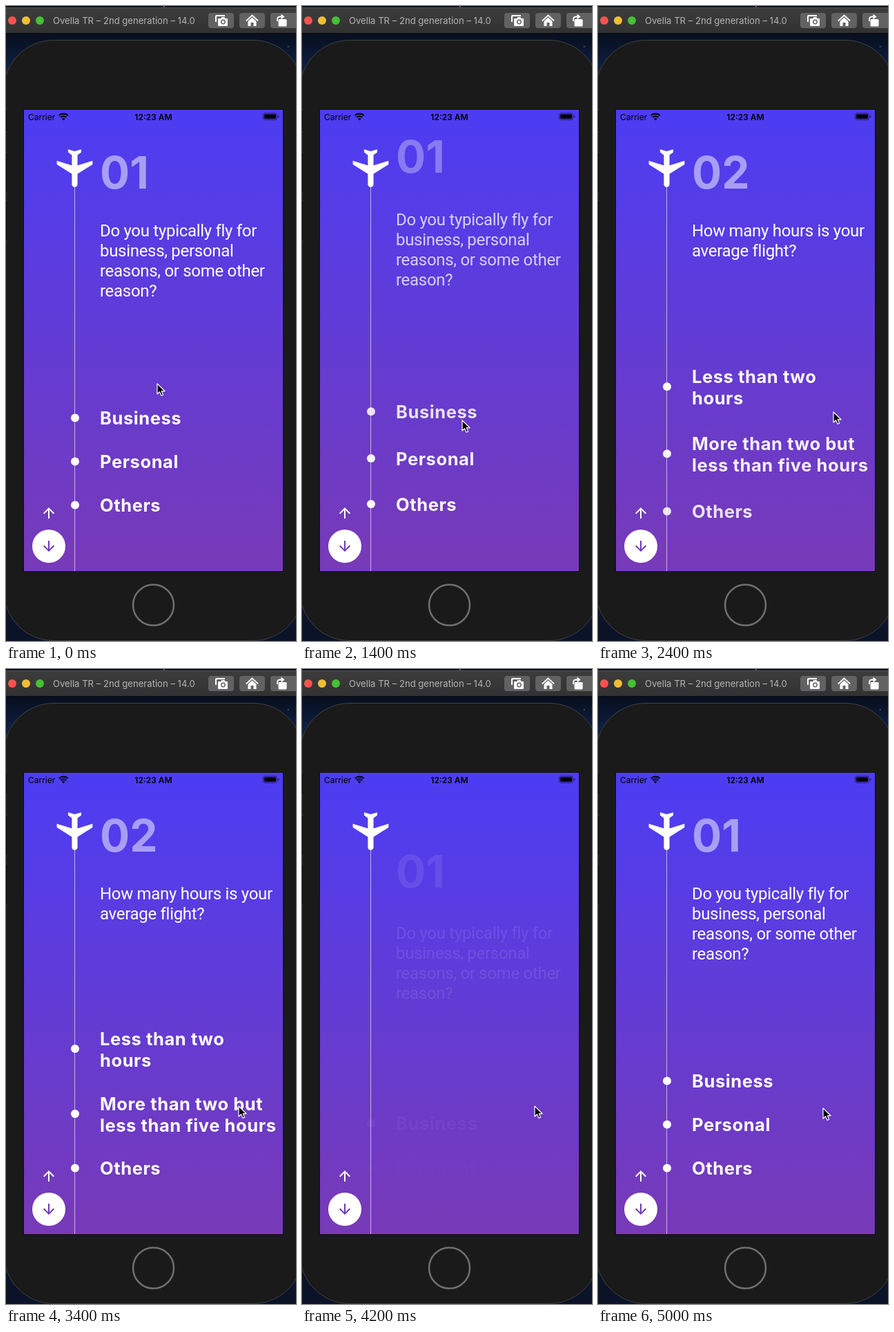
An HTML page that plays this animation: 420 px wide and 918 px high, repeating every 5100 ms.

```html
<!DOCTYPE html>
<html lang="en">
<head>
<meta charset="utf-8">
<title>Flight survey</title>
<style>
html, body { margin: 0; width: 100%; height: 100%; overflow: hidden; background: #0e1b38; }
svg { display: block; width: 420px; height: 918px; }
text { font-family: Inter, sans-serif; white-space: pre; }
.num { font-size: 64px; font-weight: 700; fill-opacity: .5; }
.ask { font-family: Roboto, sans-serif; font-size: 24px; letter-spacing: -.3px; }
.opt { font-size: 25.5px; font-weight: 700; letter-spacing: .57px; }
</style>
</head>
<body>
<svg viewBox="0 0 420 918">
  <defs>
    <linearGradient id="sky" x2="0" y2="1">
      <stop stop-color="#4c3df3"/><stop offset="1" stop-color="#783ab7"/>
    </linearGradient>
    <linearGradient id="bar" x2="0" y2="1">
      <stop stop-color="#3d3d3e"/><stop offset="1" stop-color="#313132"/>
    </linearGradient>
    <linearGradient id="desk" x2="0" y2="1">
      <stop offset=".04" stop-color="#070d1c"/>
      <stop offset=".11" stop-color="#10244a"/>
      <stop offset="1" stop-color="#0b1328"/>
    </linearGradient>
  </defs>

  <!-- desktop and window bar -->
  <rect width="420" height="918" fill="url(#desk)"/>
  <path d="M228 0h2v1.5h-2zM408 58h1.5v1.5h-1.5z" fill="#9fb0cc" opacity=".6"/>
  <rect y="2" width="420" height="37" fill="url(#bar)"/>
  <path d="M0 2.5H420" stroke="#58585a"/>
  <path d="M0 39.5H420" stroke="#080a10"/>
  <circle cx="9" cy="21" r="6" fill="#f9544f"/>
  <circle cx="29" cy="21" r="6" fill="#f0be32"/>
  <circle cx="49" cy="21" r="6" fill="#45c034"/>
  <text x="68" y="26" font-size="13.1" fill="#b4b4b5">Ovella TR – 2nd generation – 14.0</text>
  <g fill="#626263">
    <rect x="293" y="10" width="37" height="22" rx="4"/>
    <rect x="338" y="10" width="37" height="22" rx="4"/>
    <rect x="383" y="10" width="41" height="22" rx="4"/>
  </g>
  <g fill="#fff">
    <path d="M303 23V15q0-2 2-2h12v2h-11q-1 0-1 1v7z"/>
    <path d="M308 18h3l1.5-2h4l1.5 2h2q1 0 1 1v9q0 1-1 1h-12q-1 0-1-1V19q0-1 1-1z"/>
    <circle cx="314.5" cy="23" r="2.7" fill="none" stroke="#626263" stroke-width="1.4"/>
    <path d="M347.8 21.5l8.7-8 8.7 8" fill="none" stroke="#fff" stroke-width="1.8"/>
    <path d="M350.5 22l6-5.5 6 5.5v7h-4v-5h-4v5h-4z"/>
    <rect x="394.5" y="19" width="12" height="10.500" rx="1.5"/>
    <path d="M393 22v-2.500q0-4 4-4h2.500" fill="none" stroke="#fff" stroke-width="1.8"/>
    <path d="M398.500 11.500l5 4-5 4z"/>
  </g>

  <!-- phone -->
  <rect x="-3" y="49.5" width="433" height="868" rx="72" fill="#1a1a1a" stroke="#414143"/>
  <path d="M.5 150v32M.5 212v58M.5 282v58" stroke="#070707"/>
  <path d="M0 150h1M0 182h1M0 212h1M0 270h1M0 282h1M0 340h1" stroke="#555"/>
  <circle cx="213.5" cy="866" r="29.5" fill="none" stroke="#707070" stroke-width="2.5"/>
  <rect x="25.5" y="149.5" width="376" height="668" fill="none" stroke="#0c0c10"/>
  <rect x="26" y="150" width="375" height="667" fill="url(#sky)"/>

  <!-- status bar -->
  <text x="32" y="164.5" font-size="12">Carrier</text>
  <g fill="none" stroke="#000" stroke-width="2.2">
    <path d="M76.8 158.3a9 9 0 0 1 12.8 0"/>
    <path d="M79.2 161a5.6 5.6 0 0 1 8 0"/>
  </g>
  <path d="M83.2 165.5l-2.3-2.4a3.3 3.3 0 0 1 4.6 0z"/>
  <text x="213.5" y="164.5" font-size="12" font-weight="600" text-anchor="middle">12:23 AM</text>
  <rect x="372.5" y="155" width="20" height="9.5" rx="2.7" fill="none" stroke="#000" stroke-opacity=".6"/>
  <rect x="374" y="156.5" width="17" height="6.5" rx="1.4"/>
  <path d="M394 158v3.5q1.5-.5 1.5-1.75t-1.5-1.75z" opacity=".6"/>

  <!-- timeline -->
  <path d="M99.5 258V817" stroke="#fff" stroke-opacity=".6"/>
  <g id="pages" fill="#fff"></g>
  <path fill="#fff" transform="translate(68.2 267.2) scale(2.72 -2.72)"
    d="M21 16v-2l-8-5V3.5c0-.83-.67-1.5-1.5-1.5S10 2.67 10 3.5V9l-8 5v2l8-2.5V19l-2 1.5V22l3.5-1 3.5 1v-1.5L13 19v-5.5l8 2.5z"/>
  <circle cx="62" cy="781" r="24" fill="#fff"/>
  <defs>
    <path id="arrow" d="M4 12l1.41 1.41L11 7.83V20h2V7.83l5.58 5.59L20 12l-8-8-8 8z"/>
  </defs>
  <use href="#arrow" fill="#fff" transform="translate(50 721)"/>
  <use href="#arrow" fill="#6a3bbd" transform="translate(74 793) rotate(180)"/>

  <path id="cursor" d="M0 0V15l3.5-3.3 2.5 5.6 2.6-1.1-2.4-5.4H11z"
    stroke="#fff" stroke-width="1.2" stroke-linejoin="round"/>
</svg>
<script>
const NS = 'http://www.w3.org/2000/svg';
const LOOP = 5100, STEP = 100;          // the picture advances in 100 ms ticks
const FADE = 570, STAGGER = 45, SHIFT = 64;

const pages = document.getElementById('pages');
const cursor = document.getElementById('cursor');

function add(parent, tag, attrs, text = '') {
  const el = document.createElementNS(NS, tag);
  for (const k in attrs) el.setAttribute(k, attrs[k]);
  el.textContent = text;
  return parent.appendChild(el);
}

// cubic-bezier(.42, 0, .58, 1)
function ease(x) {
  if (x <= 0) return 0;
  if (x >= 1) return 1;
  let lo = 0, hi = 1;
  for (let i = 0; i < 24; i++) {
    const s = (lo + hi) / 2, r = 1 - s;
    if (3 * r * r * s * .42 + 3 * r * s * s * .58 + s * s * s < x) lo = s; else hi = s;
  }
  return lo * lo * (3 - 2 * lo);
}

// each option: first baseline, dot centre, lines
function buildPage(num, ask, options) {
  const items = [];
  const item = () => {
    const g = add(pages, 'g', {});
    items.push(g);
    return g;
  };
  const lines = (g, cls, y, gap, rows) =>
    rows.forEach((row, i) => add(g, 'text', { class: cls, x: 136, y: y + i * gap }, row));

  lines(item(), 'num', 264, 0, [num]);
  lines(item(), 'ask', 333, 29, ask);
  for (const [y, dot, ...rows] of options) {
    const g = item();
    add(g, 'circle', { cx: 100, cy: dot, r: 6 });
    lines(g, 'opt', y, 31, rows);
  }
  return items;
}

const first = buildPage('01',
  ['Do you typically fly for', 'business, personal', 'reasons, or some other', 'reason?'],
  [[605, 595.5, 'Business'], [668, 658.5, 'Personal'], [731, 721.5, 'Others']]);
const second = buildPage('02',
  ['How many hours is your', 'average flight?'],
  [[543.5, 549, 'Less than two', 'hours'],
   [637.5, 643, 'More than two but', 'less than five hours'],
   [731, 721.5, 'Others']]);

// side 1: waiting below, -1: gone above
function place(el, v, side) {
  el.setAttribute('opacity', v.toFixed(4));
  el.setAttribute('transform', `translate(0 ${(SHIFT * side * (1 - v)).toFixed(2)})`);
}

const part = (t, start, i) => ease((t - start - i * STAGGER) / FADE);
const enter = (page, t, start) => page.forEach((el, i) => place(el, part(t, start, i), 1));
const leave = (page, t, start) => page.forEach((el, i) => place(el, 1 - part(t, start, i), -1));
const clear = page => page.forEach(el => place(el, 0, 1));

// time, x, y
const track = [
  [0, 219, 546], [400, 219, 546], [1050, 232, 599], [1450, 232, 599],
  [2100, 329, 572], [2400, 341, 587], [3000, 337, 632], [4300, 337, 632],
  [4900, 326, 635], [LOOP, 326, 635]
];

function moveCursor(t) {
  const n = track.findIndex(p => p[0] > t);
  const [t0, x0, y0] = track[n - 1], [t1, x1, y1] = track[n];
  const k = ease((t - t0) / (t1 - t0));
  cursor.setAttribute('transform', `translate(${x0 + (x1 - x0) * k} ${y0 + (y1 - y0) * k})`);
}

function draw(ms) {
  const t = Math.floor(ms % LOOP / STEP) * STEP;
  if (t < 1755) leave(first, t, 1160);
  else if (t < 3980) clear(first);
  else enter(first, t, 4028);

  if (t < 1755 || t >= 3980) clear(second);
  else if (t < 3375) enter(second, t, 1798);
  else leave(second, t, 3375);

  moveCursor(t);
}

const begin = performance.now();
function tick() {
  draw(performance.now() - begin);
  requestAnimationFrame(tick);
}
tick();
</script>
</body>
</html>
```
